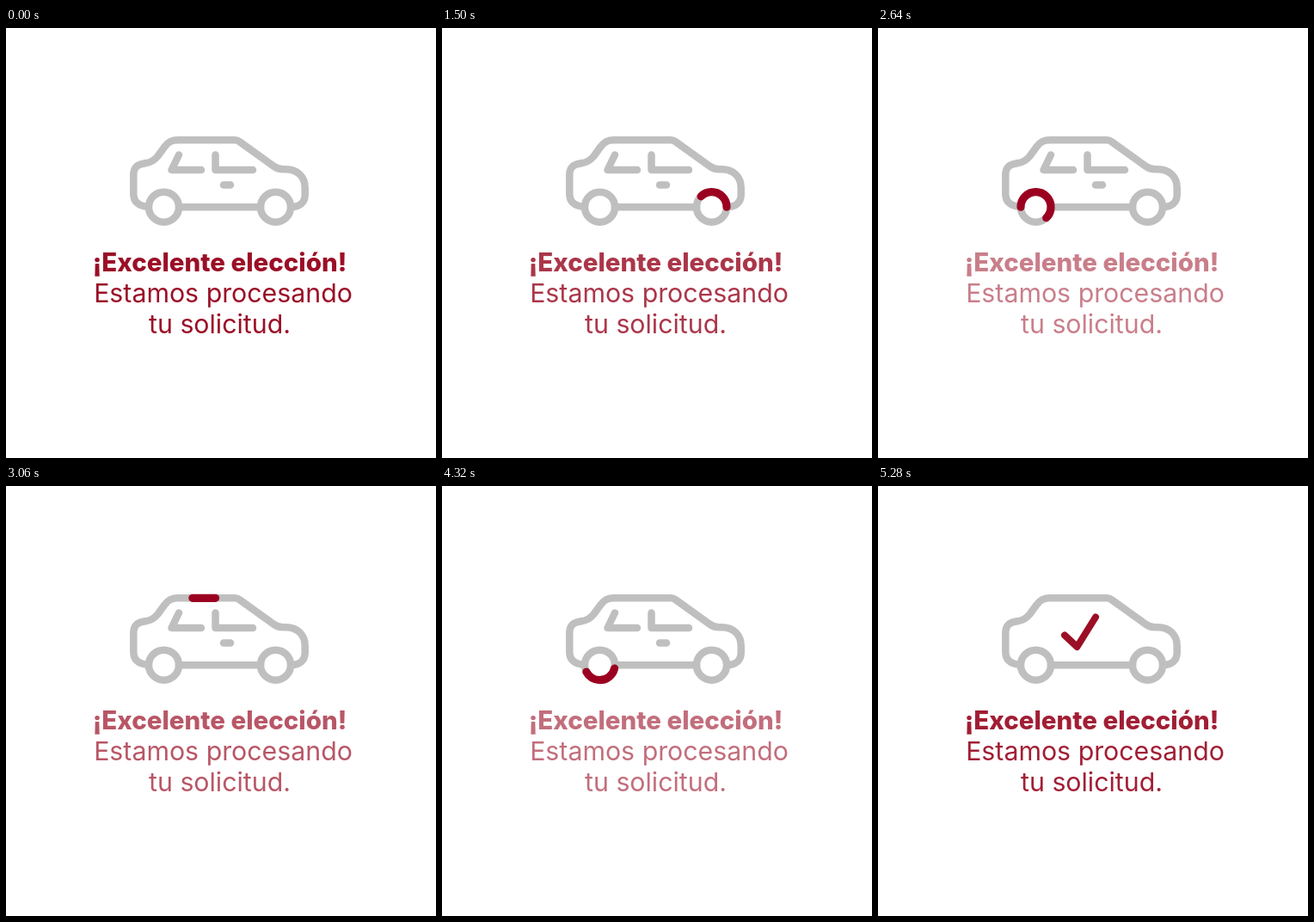
These frames come from a looping animation (500 by 500 pixels, 5.4 s). An HTML page:

```html
<!DOCTYPE html>
<html lang="es">
<head>
<meta charset="utf-8">
<title>Procesando solicitud</title>
<style>
  html, body { margin: 0; width: 100%; height: 100%; overflow: hidden; background: #fff; }
  svg { display: block; width: 100vw; height: 100vh; }
  path { fill: none; stroke-linecap: round; stroke-linejoin: round; }
  .grey { stroke: #bfbfbf; stroke-width: 8.5; }
  .red { stroke: #9b0020; stroke-width: 9.2; }
  #check { stroke: #9b0f26; stroke-width: 8; }
  text { font-family: Inter, "Open Sans", sans-serif; font-size: 30.3px; fill: #9b0f26; text-anchor: middle; }
  .bold { font-size: 29.5px; font-weight: 800; }
</style>
</head>
<body>
<svg viewBox="0 0 500 500">
  <g class="grey">
    <path id="outline"/>
    <path id="base"/>
    <g id="windows">
      <path d="M201 147.500 L192.500 165 H227"/>
      <path d="M243.500 147.500 V165 H287"/>
      <path d="M253 182.500 H261"/>
    </g>
  </g>
  <g class="red">
    <path id="upperTrace"/>
    <path id="lowerTrace"/>
    <path id="check" d="M217 173.500 L231.500 187 L253 152.500"/>
  </g>
  <g id="message">
    <text class="bold" x="248.500" y="283">¡Excelente elección!</text>
    <text x="252.500" y="319">Estamos procesando</text>
    <text x="248.500" y="355">tu solicitud.</text>
  </g>
</svg>
<script>
const LOOP = 5400, LAP = 2250, LAPS_END = 4500, PULSE = 1800, AXLE = 208.2;
const $ = id => document.getElementById(id);
const clamp = v => Math.min(1, Math.max(0, v));
const progress = (t, from, to) => clamp((t - from) / (to - from));

const arcTo = x => `A17.5 17.5 0 0 1 ${x} ${AXLE}`;
const body = `C155 207 148.3 203 148.3 193 V171 C148.3 161 154 158.5 162 157.3
  C169 156.3 173 153.5 176.5 149 L184.5 138 C189 132 193 130.3 200 130.3 H266
  Q269 130.3 272 132.5 L311 160.5 Q316 164.3 322 164.3 H325
  C339 164.3 347.7 173 347.7 186 V194 C347.7 203 341 ${AXLE} 331 ${AXLE}`;
const upper = `M166 ${AXLE} ${arcTo(201)} ${arcTo(166)} ${body} ${arcTo(296)} ${arcTo(331)}`;
const lower = `M331 ${AXLE} ${arcTo(296)} H201 ${arcTo(166)}`;

$('outline').setAttribute('d', upper);
$('base').setAttribute('d', `M201 ${AXLE} H296`);
$('upperTrace').setAttribute('d', upper);
$('lowerTrace').setAttribute('d', lower);

// Time and travelled fraction of the trailing end on the upper route.
const tailKeys = [[400, 0], [500, 0.075], [600, 0.19], [840, 0.487], [1140, 0.733],
                  [1230, 0.786], [1500, 0.92], [1710, 1]];

function along(keys, t) {
  if (t <= keys[0][0]) return keys[0][1];
  for (let i = 1; i < keys.length; i++) {
    const [t0, v0] = keys[i - 1], [t1, v1] = keys[i];
    if (t < t1) return v0 + (v1 - v0) * (t - t0) / (t1 - t0);
  }
  return keys[keys.length - 1][1];
}

function trim(id, tail, head) {
  const path = $(id), length = path.getTotalLength();
  path.style.display = head > tail ? '' : 'none';
  path.style.strokeDasharray = `${(head - tail) * length} ${length * 2}`;
  path.style.strokeDashoffset = -tail * length;
}

function draw(t) {
  const lap = t < LAPS_END ? t % LAP : 0;
  trim('upperTrace', along(tailKeys, lap), progress(lap, 25, 1180) ** 1.8);
  trim('lowerTrace', 1 - (1 - progress(lap, 1800, 2250)) ** 1.5,
    progress(lap, 1700, 2085) ** 1.2);

  const done = progress(t, 4560, 4800);
  $('windows').style.opacity = 1 - done;
  trim('check', 0, done * done * (3 - 2 * done));

  const phase = t % PULSE / PULSE;
  $('message').style.opacity = 0.5 + Math.abs(phase - 0.5);
}

const start = performance.now();
function tick() {
  draw((performance.now() - start) % LOOP);
  requestAnimationFrame(tick);
}
draw(0);
requestAnimationFrame(tick);
</script>
</body>
</html>
```
